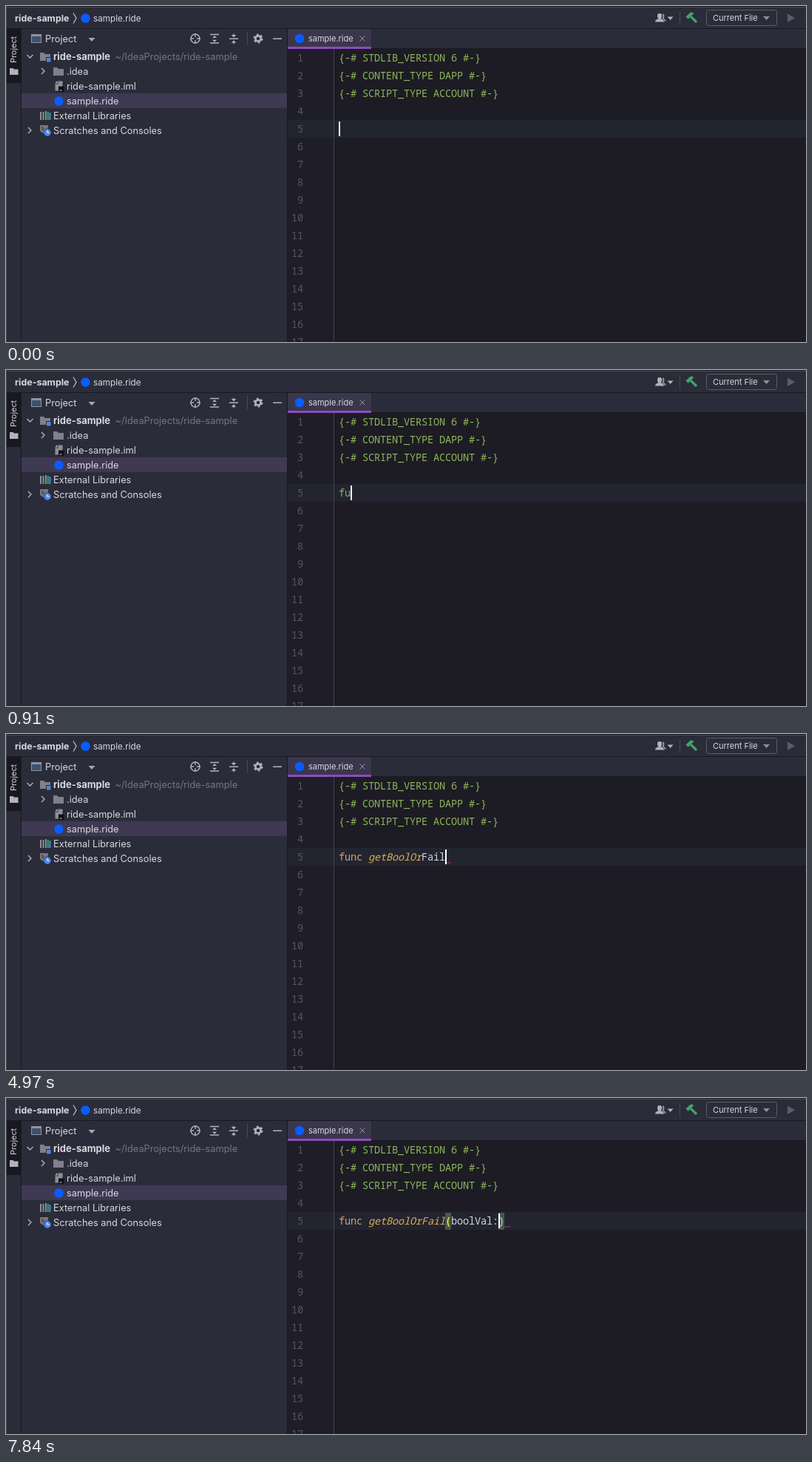
Recreate the animation shown at these times as an HTML page. Size 1082 by 454 pixels, loop 8 s.

```html
<!DOCTYPE html>
<html lang="en">
<head>
<meta charset="utf-8">
<title>Code editor typing</title>
<style>
  html, body { margin: 0; width: 100%; height: 100%; overflow: hidden; background: #1d1b24; }
  svg { display: block; width: 1082px; height: 454px; }
  text { white-space: pre; fill: #d8d8de; font: 12.8px Inter, "Open Sans", sans-serif; }
  .mono text, text.mono {
    font: 500 13.6px "Noto Sans Mono", "DejaVu Sans Mono", monospace;
    letter-spacing: -.16px;
  }
  .bold { font-weight: 700; }
  .num { fill: #57555f; text-anchor: end; }
  .green { fill: #8cb65a; }
  .orange { fill: #dda06a; }
  .plain { fill: #d3d4dc; }
  .item { fill: #c3c6cc; }
  .match { fill: #b67fdc; }
  .mono text.name { fill: #e0b04c; font-style: italic; }
  .mono text.paren { fill: #f2dc3c; font-weight: 700; }
  .line { fill: none; stroke: #b3b2ba; stroke-width: 1.4; }
  .gray { fill: #8f8e97; }
  .panel { fill: #2b2c3a; }
  .edge { fill: #1a1921; }
  .dot { fill: #0a5cff; }
  #popup { filter: drop-shadow(0 3px 8px rgba(0, 0, 0, .2)); }
</style>
</head>
<body>
<svg viewBox="0 0 1082 454">
  <!-- panels -->
  <rect width="1082" height="454" fill="#1d1b24"/>
  <rect class="panel" width="1082" height="30"/>
  <rect class="edge" width="1082" height="1"/>
  <rect y="1" width="1082" height="1" fill="#4c4b57"/>
  <rect class="edge" y="30" width="1082" height="1"/>
  <rect class="panel" y="31" width="20" height="423"/>
  <rect y="31" width="20" height="73" fill="#191820"/>
  <rect class="edge" x="20" y="31" width="1" height="423"/>
  <rect class="panel" x="21" y="31" width="359" height="423"/>
  <rect class="edge" x="380" y="31" width="1" height="423"/>
  <rect class="panel" x="381" y="31" width="701" height="26"/>
  <rect class="edge" x="381" y="57" width="701" height="1"/>
  <rect x="381" y="31" width="113" height="25" fill="#3a364b"/>
  <rect x="381" y="55" width="113" height="3" fill="#8d4bc0"/>
  <rect x="21" y="118" width="359" height="20" fill="#3f3953"/>
  <rect x="381" y="58" width="62" height="396" fill="#1f1e28"/>
  <rect x="381" y="154" width="701" height="24" fill="#222430"/>
  <rect x="443" y="58" width="1" height="396" fill="#42434b"/>
  <rect width="1" height="454" fill="#484752"/>

  <!-- top bar -->
  <text class="bold" x="12" y="21" style="font-size:12.4px">ride-sample</text>
  <path class="line" d="M91 9.5l4 7-4 7"/>
  <circle class="dot" cx="107.5" cy="16.5" r="6.3"/>
  <text x="118" y="21" style="font-size:11.7px">sample.ride</text>
  <g fill="#b3b2ba">
    <path d="M878 21.5q0-3 4.5-4.2-1.5-1.5-1.5-4 0-3.3 3-3.3t3 3.3q0 2.5-1.5 4 4.5 1.2 4.5 4.2z"/>
    <path d="M887.5 10.5q3 0 3 3.2 0 2-1.2 3.3 3.2 1 3.2 3.8h-2q-.5-2.3-3-3.3 1.5-3.5 0-7z" opacity=".75"/>
    <path d="M894.5 14.5h8l-4 4.5z"/>
  </g>
  <path d="M911.5 7v19" stroke="#4a4954"/>
  <g transform="translate(928 16) rotate(-45)" fill="#3fa46a">
    <path d="M-5-7h8l2.5 2v2.5h-10.5z"/>
    <rect x="-1.7" y="-3" width="3.4" height="11.5" rx="1"/>
  </g>
  <rect x="947.5" y="5.5" width="95" height="21" rx="3" fill="none" stroke="#5d5c67"/>
  <text x="956" y="20" style="font-size:11px">Current File</text>
  <path class="gray" d="M1024 14h9l-4.5 5z"/>
  <path d="M1057 10.5v11.5l10-5.7z" fill="#5d5c66"/>

  <!-- left strip -->
  <text transform="translate(14 77) rotate(-90)" style="font-size:10.9px">Project</text>
  <path d="M5 84h4.5l1.5 1.5h5.5v7.5h-11.5z" fill="#b3b2ba"/>

  <!-- project header -->
  <rect x="34.5" y="38.5" width="13" height="11" fill="#3b5270" stroke="#92919b"/>
  <rect x="34" y="38" width="14" height="3" fill="#92919b"/>
  <text x="53" y="49">Project</text>
  <path d="M111.5 43h9l-4.5 5z" fill="#a9a8b0"/>
  <g class="line">
    <circle cx="256" cy="44" r="6"/>
    <path d="M256 37v5m0 4v5m-7-7h5m4 0h5"/>
    <path d="M276 38.5h12m-12 11.5h12"/>
    <path d="M302 44.3h12M361 44.3h12"/>
    <circle cx="341" cy="44" r="3.6" style="stroke-width:2.6"/>
    <circle cx="341" cy="44" r="5.5" style="stroke-width:2" stroke-dasharray="2.9 2.86"/>
  </g>
  <path d="M282 40l3 3h-6zm0 8.8l3-3h-6zM308 42.5l3.2-3.5h-6.4zm0 3.7l3.2 3.5h-6.4z" fill="#b3b2ba"/>
  <path d="M308 37.5v3m0 8v3" stroke="#b3b2ba"/>
  <path d="M326.5 35v18" stroke="#4a4954"/>

  <!-- tree -->
  <g class="line">
    <path d="M28.5 66l4 4 4-4"/>
    <path d="M48 84l4 4-4 4"/>
    <path d="M30 164l4 4-4 4"/>
  </g>
  <path d="M46 63h5l2 2h7v9h-14z" fill="#817f8c"/>
  <rect class="panel" x="54" y="69" width="7" height="7"/>
  <rect x="55" y="70" width="5.5" height="5.5" fill="#4c86df"/>
  <text class="bold" x="64" y="73" style="font-size:13px">ride-sample</text>
  <text x="147.5" y="73" style="fill:#77757f">~/IdeaProjects/ride-sample</text>
  <path d="M64 83h5l2 2h7v9h-14z" fill="#817f8c"/>
  <text x="82" y="93">.idea</text>
  <path class="gray" d="M70.5 101.5h6v13h-10v-9h4z"/>
  <path d="M66 104.5l3.5-3.5v3.5z" fill="#b3b2ba"/>
  <rect x="71" y="108.5" width="7.5" height="7.5" fill="#111016"/>
  <path d="M72.5 114h3" stroke="#d8d8de"/>
  <text x="82" y="113">ride-sample.iml</text>
  <circle class="dot" cx="71.5" cy="128.5" r="6.3"/>
  <text x="82" y="133">sample.ride</text>
  <g class="gray">
    <rect x="46" y="143" width="2" height="11"/>
    <rect x="49.5" y="143" width="2" height="11"/>
    <rect x="53" y="142" width="2" height="12" fill="#4fae7b"/>
    <rect x="56" y="143" width="1.5" height="11" fill="#4fae7b"/>
    <rect x="58.5" y="144" width="2" height="10" fill="#4c86df"/>
  </g>
  <text x="64" y="153">External Libraries</text>
  <path d="M46 161h11v11h-7l-4-3z" fill="#77757f"/>
  <path d="M48 163.5l3 2-3 2" fill="none" stroke="#2b2c3a"/>
  <circle class="panel" cx="56" cy="171" r="5.5"/>
  <circle cx="56" cy="171" r="4.7" fill="#4c8af0"/>
  <path d="M56 168v3.2h2.5" fill="none" stroke="#fff"/>
  <text x="64" y="173">Scratches and Consoles</text>

  <!-- tab -->
  <circle class="dot" cx="397" cy="44" r="6.3"/>
  <text x="409" y="48" style="font-size:11px">sample.ride</text>
  <path d="M478.5 40.5l7 7m0-7l-7 7" stroke="#92919b"/>

  <g id="page" class="mono"></g>
  <g id="code" class="mono"></g>
  <g id="popup"></g>
</svg>
<script>
const LOOP = 8000, LEFT = 450, CELL = 8, BASE = 171;
const PAREN_TIME = 5810;
const $ = id => document.getElementById(id);
const col = n => LEFT + n * CELL;
const rect = (x, y, w, h, fill) =>
  `<rect x="${x}" y="${y}" width="${w}" height="${h}" fill="${fill}"/>`;
const label = (x, y, cls, s) => `<text x="${x}" y="${y}" class="${cls}">${s}</text>`;

// time, text, count of coloured name letters (-1: not parsed yet), popup rows, closing paren coloured
const steps = [
  [0, ""],
  [350, "f"],
  [420, "f", -1, ["func", "if", "nft"]],
  [490, "fu", -1, ["func"]],
  [910, "fu"],
  [980, "func"],
  [1330, "func", 0],
  [1960, "func ", 0],
  [2100, "func g", 0],
  [2310, "func ge", 0],
  [2520, "func get", 0],
  [2800, "func get", 3],
  [2940, "func getB", 3],
  [3150, "func getBo", 3],
  [3290, "func getBoo", 3],
  [3500, "func getBool", 3],
  [3850, "func getBool", 7],
  [4060, "func getBoolO", 7],
  [4200, "func getBoolOr", 7],
  [4550, "func getBoolOrF", 9],
  [4690, "func getBoolOrFa", 9],
  [4830, "func getBoolOrFai", 9],
  [4970, "func getBoolOrFail", 9],
  [5320, "func getBoolOrFail", 13],
  [5530, "func getBoolOrFail()", 13],
  [PAREN_TIME, "func getBoolOrFail()", 13, null, true],
  [6160, "func getBoolOrFail(b)", 13],
  [6300, "func getBoolOrFail(bo)", 13],
  [6370, "func getBoolOrFail(boo)", 13],
  [6510, "func getBoolOrFail(bool)", 13],
  [6860, "func getBoolOrFail(bool)", 13, null, true],
  [7140, "func getBoolOrFail(boolV)", 13],
  [7280, "func getBoolOrFail(boolVa)", 13],
  [7490, "func getBoolOrFail(boolVal)", 13],
  [7840, "func getBoolOrFail(boolVal:)", 13]
];

function drawPage() {
  const head = ["STDLIB_VERSION 6", "CONTENT_TYPE DAPP", "SCRIPT_TYPE ACCOUNT"];
  let out = "";
  for (let i = 0; i < 17; i++) {
    const y = 75 + 24 * i;
    out += label(402, y, "num", i + 1);
    if (head[i]) out += label(LEFT, y, "green", `{-# ${head[i]} #-}`);
  }
  $("page").innerHTML = out;
}

function codeLine(text, done, closed, time) {
  const open = text.indexOf("("), end = text.length;
  const caret = open < 0 ? end : end - 1;
  const run = (from, to, cls) =>
    to > from ? label(col(from), BASE, cls, text.slice(from, to)) : "";
  let out = "";
  if (done < 0) {
    out = run(0, end, "green");
  } else {
    const nameEnd = open < 0 ? end : open;
    const split = Math.min(5 + done, nameEnd);
    if (open >= 0) {
      out += rect(col(open), 155, CELL, 23, "#43594e") + rect(col(end - 1), 155, CELL, 23, "#43594e");
    }
    out += run(0, 4, "orange") + run(5, split, "name") + run(split, nameEnd, "plain");
    if (open >= 0) {
      out += run(open, open + 1, time < PAREN_TIME ? "plain" : "paren");
      out += run(open + 1, end - 1, "plain");
      out += run(end - 1, end, closed ? "paren" : "plain");
    }
    out += `<path d="M${col(end)} 173l2 2 2-2 2 2 2-2" fill="none" stroke="#95405f"/>`;
  }
  return out + rect(col(caret), 156, 2, 20, "#fff");
}

function popupBox(rows, typed) {
  if (!rows) return "";
  const foot = 178 + 22 * rows.length;
  let out = rect(444, 178, 517, foot - 156, "#55565a");
  out += rect(444, 178, 516, foot - 178, "#363937") + rect(444, 178, 516, 22, "#353149");
  out += rect(444, foot, 516, 21, "#45464a");
  rows.forEach((word, i) => {
    const y = 194 + 22 * i, at = word.indexOf(typed), stop = at + typed.length;
    const part = (a, b, cls) => label(col(a) - 1, y, "mono " + cls, word.slice(a, b));
    out += part(0, at, "item") + part(at, stop, "match") + part(stop, word.length, "item");
  });
  const tip = (x, fill, s) =>
    `<text x="${x}" y="${foot + 14}" style="font-size:11.1px;fill:${fill}">${s}</text>`;
  out += tip(452, "#a2a2a7", "Press ^. to choose the selected (or first) suggestion and insert a dot afterwards");
  out += tip(876, "#7d9cf2", "Next Tip");
  for (let i = -1; i < 2; i++) {
    out += `<circle cx="950" cy="${foot + 10.5 + 4.5 * i}" r="1.4" fill="#c8c8cc"/>`;
  }
  return out;
}

let shown = null;
function draw(now) {
  const time = now % LOOP;
  const step = steps.findLast(s => s[0] <= time) || steps[0];
  if (step !== shown) {
    const [at, text, done = -1, rows, closed] = step;
    $("code").innerHTML = codeLine(text, done, closed, at);
    $("popup").innerHTML = popupBox(rows, text);
    shown = step;
  }
}

drawPage();
draw(0);
const start = performance.now();
(function tick() {
  draw(performance.now() - start);
  requestAnimationFrame(tick);
})();
</script>
</body>
</html>
```
